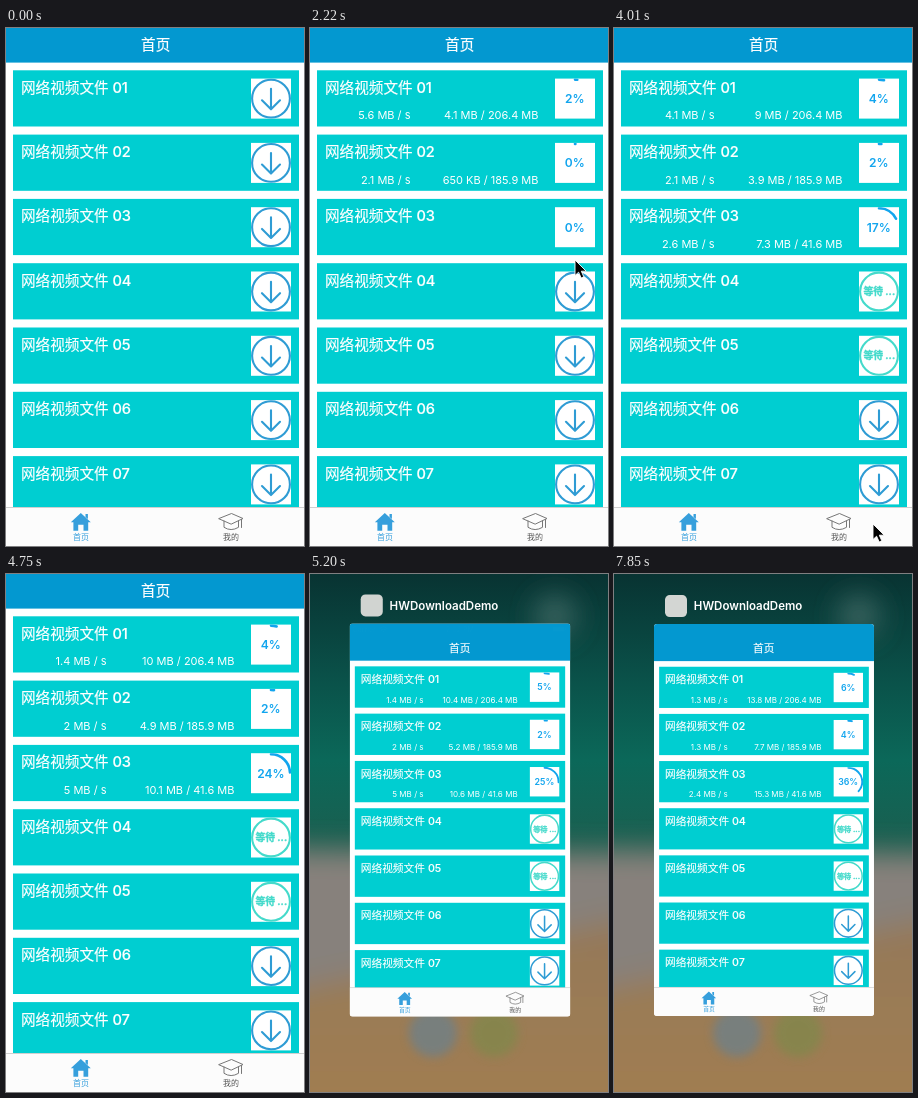
These frames come from a looping animation (298 px wide and 518 px high, 8000 ms). An HTML page:

```html
<!DOCTYPE html>
<html lang="zh-CN">
<head>
<meta charset="utf-8">
<title>首页</title>
<style>
  html, body { margin: 0; width: 100%; height: 100%; overflow: hidden; background: #fff; }
  svg { display: block; width: 100%; height: 100%; font-family: Inter, "Noto Sans CJK SC", "Noto Sans CJK", sans-serif; }
  .line { fill: none; stroke-linecap: round; stroke-linejoin: round; }
  .name { font-size: 14.6px; font-weight: 500; fill: #fff; stroke: #fff; stroke-width: .2px; }
  .info { font-size: 11px; fill: #fff; text-anchor: end; }
  .percent { font-size: 12px; font-weight: 600; fill: #12a5ee; text-anchor: middle; }
  .wait { font-size: 9.8px; font-weight: 700; fill: #45dacb; stroke: #45dacb; stroke-width: .35px; text-anchor: middle; }
  .tab { font-size: 8px; text-anchor: middle; }
  .status { font-size: 9.6px; fill: #fff; }
</style>
</head>
<body>
<svg viewBox="0 0 298 518" preserveAspectRatio="none">
  <defs>
    <linearGradient id="sea" x2="0" y2="1">
      <stop offset="0" stop-color="#083332"/>
      <stop offset=".2" stop-color="#0a5149"/>
      <stop offset=".36" stop-color="#0b6859"/>
      <stop offset=".55" stop-color="#1d5d4e"/>
    </linearGradient>
    <linearGradient id="sand" x2="0" y2="1">
      <stop offset="0" stop-color="#93785a"/>
      <stop offset="1" stop-color="#a67f4c"/>
    </linearGradient>
    <filter id="soft" x="-30%" y="-30%" width="160%" height="160%"><feGaussianBlur stdDeviation="14"/></filter>
    <filter id="dim" x="-30%" y="-30%" width="160%" height="160%"><feGaussianBlur stdDeviation="5"/></filter>
    <clipPath id="card"><rect y="-16" width="300" height="534.4" rx="4"/></clipPath>
    <clipPath id="square"><rect x="245" y="8.3" width="40" height="40"/></clipPath>
  </defs>

  <g id="wallpaper">
    <rect width="298" height="518" fill="url(#sea)"/>
    <g filter="url(#soft)">
      <path d="M-60 275L360 280V600H-60Z" fill="#87817b"/>
      <path d="M-60 425L360 335V600H-60Z" fill="url(#sand)"/>
      <circle cx="245" cy="42" r="20" fill="#3c6662"/>
    </g>
    <g filter="url(#dim)" opacity=".8">
      <circle cx="123" cy="459" r="24" fill="#6f8087"/>
      <circle cx="184" cy="459" r="24" fill="#82874c"/>
    </g>
  </g>

  <g id="device">
    <g id="label">
      <rect x="15" y="-55.5" width="30" height="30" rx="6.5" fill="#d3d6d3"/>
      <text x="54.3" y="-35" font-size="15.7" font-weight="600" fill="#fff">HWDownloadDemo</text>
    </g>
    <g id="screen">
      <rect y="-16" width="300" height="534.4" fill="#fff"/>
      <rect y="-16" width="300" height="50.6" fill="#0398d0"/>
      <g id="status" class="status">
        <text x="4" y="-5">Carrier</text>
        <path class="line" d="M41-9q5-5 10 0M43-7q3-3 6 0M46-5.2h.1" stroke="#fff" stroke-width="1.4"/>
        <text x="150" y="-5" text-anchor="middle">2:02 PM</text>
        <rect x="276" y="-11" width="16" height="6" rx="1" fill="#fff"/>
        <rect x="293" y="-9.5" width="1.2" height="3" fill="#fff"/>
      </g>
      <text class="name" x="149.7" y="22.4" text-anchor="middle">首页</text>
      <g id="rows"></g>
      <rect y="479" width="300" height="40" fill="#fcfcfc"/>
      <rect y="479" width="300" height=".7" fill="#bdbdbd"/>
      <path d="M74.8 485L84.8 494.3H82.2V502.8H77.5V496.8H72.2V502.8H67.4V494.3H64.8ZM79.5 486h2.4v5l-2.4-2Z" fill="#369fdc"/>
      <text class="tab" x="75" y="512.4" fill="#369fdc">首页</text>
      <path class="line" d="M213 490.5L225.5 485.5 237 490.5 225.5 496ZM218 493v6.3q7 4.5 14.5 0V493M235.5 491.5v8" stroke="#777"/>
      <text class="tab" x="225" y="512.4" fill="#555">我的</text>
    </g>
  </g>
  <path id="cursor" d="M0 0V15.5L3.6 12.2 6.2 18 8.8 16.8 6.3 11.2H11.2Z" stroke="#fff" stroke-width=".9"/>
</svg>
<script>
const LOOP = 8000, FIRST_TICK = 1037, TICK = 147.8;
const STARTED = 14, LEFT_APP = 25, END = 46;  // key moments, in ticks
const SPEED_REFRESH = 7;
const ROWS = 7;
const $ = id => document.getElementById(id);

// Piecewise linear track through [tick, value] points
function along(points, tick) {
  const next = points.findIndex(([at]) => tick <= at);
  if (next < 1) return points[next ? points.length - 1 : 0][1];
  const [a, from] = points[next - 1], [b, to] = points[next];
  return from + (to - from) * (tick - a) / (b - a);
}

const atKeys = ([started, left, end]) =>
  [[STARTED, started], [LEFT_APP, left], [LEFT_APP + 1, left], [END, end]];

// Megabytes loaded and per second at the three key moments
const downloads = [
  { start: 1, total: 206.4, loaded: [7.7, 10, 13.8], speed: [5.6, 1.4, 1.3] },
  { start: 6, total: 185.9, loaded: [2.6, 4.9, 7.7], speed: [2.1, 2, 1.3] },
  { start: 8, total: 41.6, loaded: [4, 10.1, 15.3], speed: [1.3, 5, 2.4] }
];
const queueStart = index => 11 + 2 * (index - downloads.length);

const cursorX = [[8, 265], [14, 259]];
const cursorY = [[0, 72], [8, 232], [14, 328], [20, 496]];

$('rows').innerHTML = Array.from({ length: ROWS }, (_, i) => `
  <g transform="translate(0 ${42.3 + 64.3 * i})">
    <rect x="7" width="286" height="56.2" fill="#00ced1"/>
    <text class="name" x="15" y="22.6">网络视频文件 0${i + 1}</text>
    <text class="info speed" x="100.5" y="49.2"></text>
    <text class="info size" x="228.5" y="49.2"></text>
    <rect x="245" y="8.3" width="40" height="40" fill="#fff"/>
    <g class="idle line" stroke="#2f9cd4" stroke-width="2.1">
      <circle cx="265" cy="28.3" r="18.9"/>
      <path d="M265 18.5V38.6M256 30L265 39 274 30"/>
    </g>
    <g class="queued">
      <circle class="line" cx="265" cy="28.3" r="18.9" stroke="#45dacb" stroke-width="2.1"/>
      <text class="wait" x="265.3" y="31.8">等待 ...</text>
    </g>
    <g class="active" clip-path="url(#square)">
      <circle class="arc line" cx="265" cy="28.3" r="19" pathLength="100" stroke="#12a5ee" stroke-width="2.6" transform="rotate(-90 265 28.3)"/>
      <text class="percent" x="264.8" y="32.8"></text>
    </g>
  </g>`).join('');

const rows = [...$('rows').children].map(row => {
  const part = name => row.querySelector('.' + name);
  return { speed: part('speed'), size: part('size'), idle: part('idle'), queued: part('queued'),
    active: part('active'), arc: part('arc'), percent: part('percent') };
});

const show = (node, on) => node.style.display = on ? '' : 'none';
const amount = mb => mb < 1 ? Math.round(mb * 1000) + ' KB' : +mb.toFixed(1) + ' MB';

function drawDownload(row, { start, total, loaded, speed }, tick) {
  const done = along([[start, 0], ...atKeys(loaded)], tick);
  const measured = tick - (tick - LEFT_APP + 10 * SPEED_REFRESH) % SPEED_REFRESH;
  row.speed.textContent = done ? amount(along(atKeys(speed), measured)) + ' / s' : '';
  row.size.textContent = done ? `${amount(done)} / ${total} MB` : '';
  show(row.arc, done > 0);
  const percent = 100 * done / total;
  row.arc.setAttribute('stroke-dasharray', `${percent} 200`);
  row.percent.textContent = Math.floor(percent) + '%';
}

function drawRow(row, index, tick) {
  const item = downloads[index];
  const active = Boolean(item) && tick >= item.start;
  const queued = !item && index < downloads.length + 2 && tick >= queueStart(index);
  show(row.active, active);
  show(row.queued, queued);
  show(row.idle, !active && !queued);
  if (item) drawDownload(row, item, tick);
}

function draw() {
  const time = performance.now() % LOOP;
  const tick = Math.floor((time - FIRST_TICK) / TICK);
  rows.forEach((row, i) => drawRow(row, i, tick));

  // Each tick covers four fifths of the way left to the app switcher pose
  const away = 1 - .2 ** Math.max(0, tick - LEFT_APP);
  show($('wallpaper'), away > 0);
  show($('label'), away > 0);
  $('label').style.opacity = away;
  $('status').style.opacity = 2 * (1 - away);
  $('screen').setAttribute('clip-path', away ? 'url(#card)' : 'none');
  $('device').setAttribute('transform',
    `translate(${40 * away} ${66 * away - 16}) scale(${1 - .2667 * away}) translate(0 16)`);

  show($('cursor'), tick >= 0 && tick <= 20);
  $('cursor').setAttribute('transform', `translate(${along(cursorX, tick)} ${along(cursorY, tick)})`);
  requestAnimationFrame(draw);
}
draw();
</script>
</body>
</html>
```
